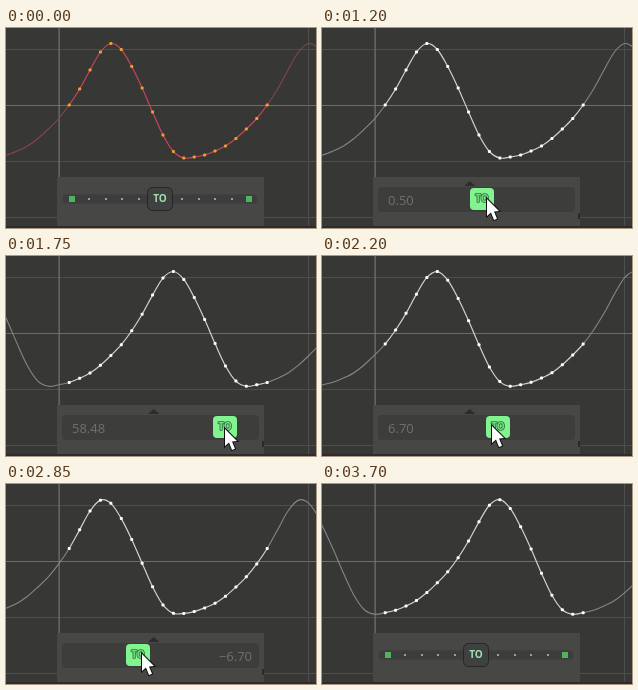
An HTML page with a canvas for the animation above (3.8 s loop, 310 by 200 pixels).

```html
<!DOCTYPE html>
<html lang="en">
<head>
<meta charset="utf-8">
<title>Time offset slider</title>
<style>
html, body { margin: 0; width: 100%; height: 100%; overflow: hidden; background: #373736; }
canvas { display: block; width: 310px; height: 200px; }
</style>
</head>
<body>
<canvas id="stage" width="310" height="200"></canvas>
<script>
const ctx = document.getElementById('stage').getContext('2d');
const LOOP = 3800, STEP = 50;
const PRESS = 750, RELEASE = 3500, HOVER_IN = 450, HOVER_OUT = 3650;
const KEY_X = 63.2, KEY_GAP = 10.42, MID_X = 154, MID_Y = 171;

// One cycle of the curve, one height per key.
const cycle = [77, 61, 42, 24, 15.5, 21.5, 38.5, 60, 84, 107,
  123.5, 130, 129, 127, 123, 118, 110.5, 101, 90.5];

// Handle travel from the centre: [ms, px]
const drag = [[750, 0], [800, -5], [950, -34], [1050, -20], [1150, 1], [1200, 6],
  [1250, 11], [1500, 42], [1650, 61], [1700, 65], [1850, 65], [1900, 61], [2000, 46],
  [2150, 24], [2200, 22], [2250, 16], [2500, -24], [2800, -24], [2850, -22],
  [2900, -18], [3150, 52], [3200, 59], [3250, 65], [3300, 70]];
const cursorRise = [[100, 0], [450, 166], [750, 168], [950, 178], [1200, 171],
  [1750, 173], [2200, 170]];

function at(track, t) {
  if (t <= track[0][0]) return track[0][1];
  for (let i = 1; i < track.length; i++) {
    const [t0, a] = track[i - 1], [t1, b] = track[i];
    if (t <= t1) return a + (b - a) * (t - t0) / (t1 - t0);
  }
  return track[track.length - 1][1];
}

const travel = t => Math.round(at(drag, t));
const valueOf = d => Math.sign(d) * 100 * (d / 85) ** 2;

function cycleAt(u) {
  const n = cycle.length, i = Math.floor(u), f = u - i;
  const [a, b, c, d] = [-1, 0, 1, 2].map(k => cycle[(((i + k) % n) + n) % n]);
  return b + f * (c - a + f * (2 * a - 5 * b + 4 * c - d + f * (3 * (b - c) + d - a))) / 2;
}

function box(x, y, w, h, r, fill, stroke) {
  ctx.beginPath();
  ctx.roundRect(x, y, w, h, r);
  ctx.fillStyle = fill;
  ctx.fill();
  if (stroke) {
    ctx.strokeStyle = stroke;
    ctx.lineWidth = 1;
    ctx.stroke();
  }
}

function rect(x, y, w, h, color) {
  ctx.fillStyle = color;
  ctx.fillRect(x, y, w, h);
}

function grid() {
  rect(0, 0, 310, 200, '#373736');
  for (const y of [21, 133, 189]) rect(0, y, 310, 1, '#4e4e4d');
  rect(302, 0, 1, 200, '#4e4e4d');
  rect(0, 77, 310, 1, '#6c6c6b');
  rect(52.5, 0, 1.2, 200, '#757574');
}

function curve(offset, selected) {
  const x = i => KEY_X + i * KEY_GAP;
  const y = i => cycleAt(i - offset);
  const trace = (from, to, color, width) => {
    ctx.beginPath();
    ctx.moveTo(x(from), y(from));
    for (let i = from; i < to; i++) {
      ctx.bezierCurveTo(
        x(i + 1 / 3), y(i) + (y(i + 1) - y(i - 1)) / 6,
        x(i + 2 / 3), y(i + 1) - (y(i + 2) - y(i)) / 6,
        x(i + 1), y(i + 1));
    }
    ctx.strokeStyle = color;
    ctx.lineWidth = width;
    ctx.stroke();
  };
  const outer = selected ? '#858584' : '#83464e';
  trace(-7, 0, outer, 1.1);
  trace(19, 25, outer, 1.1);
  trace(0, 19, selected ? '#d0d0cf' : '#c44656', 1.2);
  for (let i = 0; i < 20; i++) {
    box(x(i) - 1.5, y(i) - 1.5, 3, 3, 1, selected ? '#ffffff' : '#f0a030');
  }
}

function label(x, fill, stroke) {
  ctx.font = 'bold 10px "Open Sans", sans-serif';
  ctx.textAlign = 'center';
  ctx.textBaseline = 'middle';
  if (stroke) {
    ctx.strokeStyle = stroke;
    ctx.lineWidth = 1.6;
    ctx.lineJoin = 'round';
    ctx.strokeText('TO', x, MID_Y + 0.5);
  }
  ctx.fillStyle = fill;
  ctx.fillText('TO', x, MID_Y + 0.5);
}

function idleSlider() {
  box(57, 166.5, 194, 9, 3, '#3c3d3c');
  for (const side of [-1, 1]) {
    const end = MID_X + 0.4 + side * 88.4;
    rect(Math.round(end - 3), 168, 6, 6, '#50b45f');
    for (let k = 0; k < 4; k++) {
      rect(Math.round(MID_X + 0.4 + side * (21.6 + k * 16.6)) - 1, 170, 2, 2, '#78b588');
    }
  }
  box(141.5, 159.5, 25, 23, 5, '#3e413f', '#252625');
  label(MID_X, '#a3dfb2');
}

function activeSlider(d) {
  box(56, 159, 197, 25, 4, '#3d3d3c');
  const v = valueOf(d), right = v < 0;
  ctx.font = '13px "Open Sans", sans-serif';
  ctx.textAlign = right ? 'right' : 'left';
  ctx.textBaseline = 'alphabetic';
  ctx.fillStyle = '#717170';
  ctx.fillText((right ? '\u2212' : '') + Math.abs(v).toFixed(2), right ? 246 : 66, 177);
  const x = MID_X + d;
  box(x - 12, 160, 24, 22, 4, '#82f48f');
  label(x, '#76d986', '#2c6c3a');
}

function hoverMarks() {
  ctx.beginPath();
  ctx.moveTo(142, 158);
  ctx.lineTo(147.7, 153);
  ctx.lineTo(153.4, 158);
  ctx.fillStyle = '#2c2c2c';
  ctx.fill();
  rect(256, 185, 2, 6, '#2a2a2a');
}

function cursor(x, y) {
  const shape = [[0, 0], [0, 17], [4, 13.5], [7, 21], [10, 19.7], [7, 12.5], [12, 12]];
  ctx.beginPath();
  for (const [px, py] of shape) ctx.lineTo(x + px, y + py);
  ctx.closePath();
  ctx.fillStyle = '#ffffff';
  ctx.strokeStyle = '#111111';
  ctx.lineWidth = 2;
  ctx.lineJoin = 'miter';
  ctx.stroke();
  ctx.fill();
}

function cursorX(t) {
  if (t < PRESS) return at([[100, 190], [450, 158], [700, 156]], t);
  return MID_X + travel(t + STEP) + (t >= HOVER_OUT ? 8 : 0);
}

function draw(t) {
  grid();
  // The curve trails the handle by a step; the pointer leads it by one.
  curve(valueOf(travel(t - STEP)) / 10, t >= STEP);
  rect(51, 149, 207, 51, '#474746');
  rect(0, 198, 310, 2, '#2d2b2c');
  if (t >= PRESS && t < RELEASE) activeSlider(travel(t));
  else idleSlider();
  if (t >= HOVER_IN && t < HOVER_OUT) hoverMarks();
  if (t >= 100 && t < 3700) cursor(cursorX(t), at(cursorRise, t));
}

const start = performance.now();
function tick() {
  const t = (performance.now() - start) % LOOP;
  draw(Math.floor(t / STEP) * STEP);
  requestAnimationFrame(tick);
}
tick();
</script>
</body>
</html>
```
